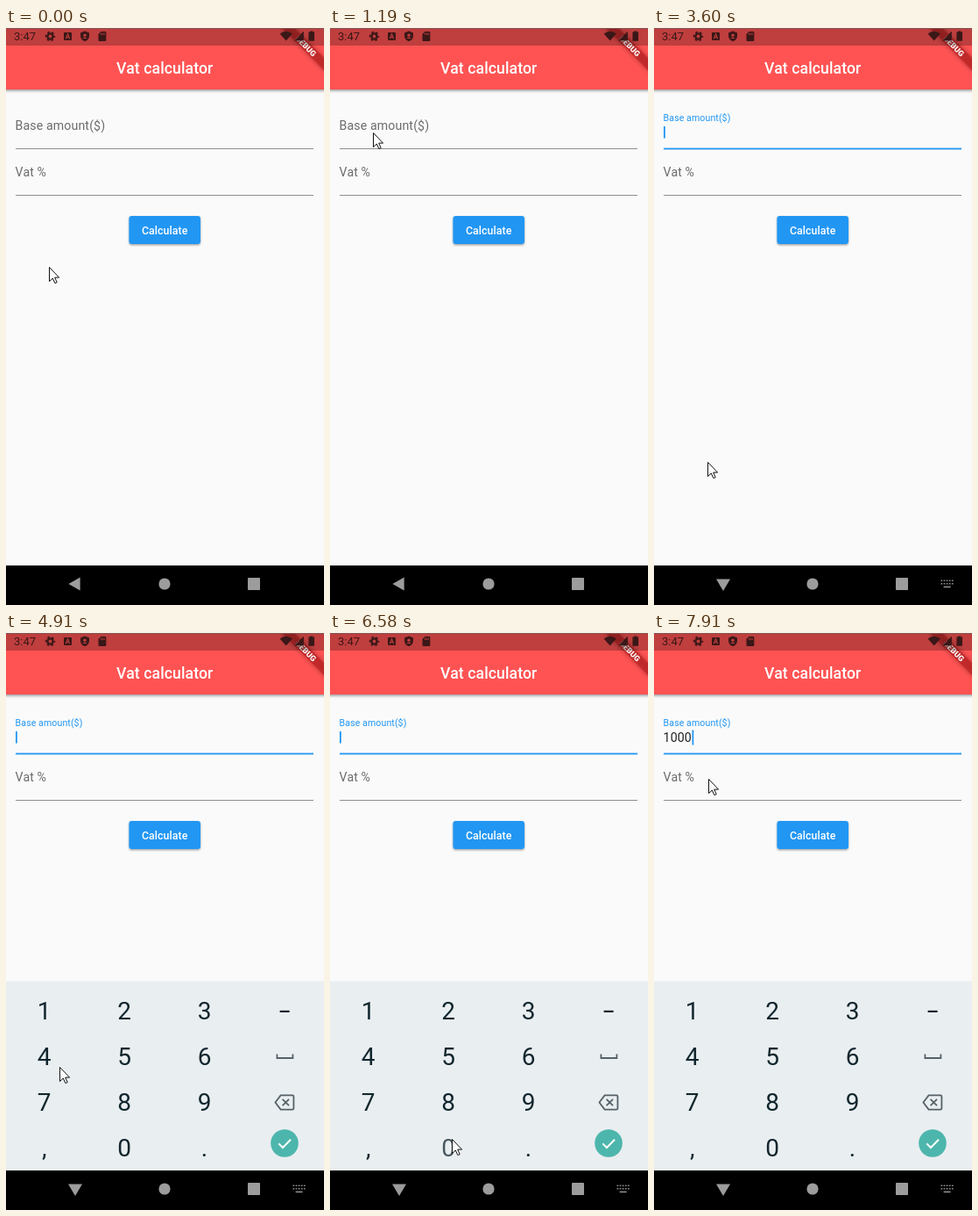
Animation of 363 by 657 pixels, one loop 8 s. Source, as an HTML page:

```html
<!DOCTYPE html>
<html lang="en">
<head>
<meta charset="utf-8">
<title>Vat calculator</title>
<style>
  html, body { margin: 0; width: 100%; height: 100%; overflow: hidden; background: #fafafa; }
  svg { display: block; width: 363px; height: 657px; font-family: Roboto, Arial, sans-serif; }
  .mid { text-anchor: middle; }
  .medium { font-weight: 500; fill: #fff; }
  .field { font-size: 14.13px; letter-spacing: .13px; }
  .label { fill: #6c6c6c; }
  .focus { fill: #2196f3; }
  .digit { font-size: 28px; fill: #11262d; }
  .icon { fill: #3b1717; }
  .nav { fill: #9c9c9c; }
</style>
</head>
<body>
<svg viewBox="0 0 363 657" xmlns="http://www.w3.org/2000/svg">
  <defs>
    <filter id="barShadow" x="-5%" y="-20%" width="110%" height="150%">
      <feDropShadow dx="0" dy="1.6" stdDeviation="1.7" flood-opacity=".38"/>
    </filter>
    <filter id="btnShadow" x="-10%" y="-20%" width="120%" height="150%">
      <feDropShadow dx="0" dy="1.3" stdDeviation="1" flood-opacity=".36"/>
    </filter>
    <filter id="bannerShadow" x="-10%" y="-80%" width="120%" height="260%">
      <feDropShadow dx="0" dy="0" stdDeviation="2.4" flood-opacity=".5"/>
    </filter>
  </defs>
  <rect width="363" height="657" fill="#fafafa"/>

  <!-- app bar -->
  <rect x="-6" y="-6" width="375" height="76" fill="#ff5252" filter="url(#barShadow)"/>
  <text class="mid medium" x="181.2" y="52" font-size="17.66" letter-spacing=".08">Vat calculator</text>

  <!-- form -->
  <text id="baseLabel" class="field label" x="10.6" y="116">Base amount($)</text>
  <text id="value" class="field" x="10.6" y="123.5" fill="#222"></text>
  <rect id="baseLine" x="11" width="340"/>
  <rect id="caret" fill="#2196f3"/>
  <text class="field label" x="10.6" y="169">Vat %</text>
  <rect x="11" y="190" width="340" height="1" fill="#8f8f8f"/>
  <rect x="140.4" y="214" width="81.6" height="32" rx="3.2" fill="#2196f3" filter="url(#btnShadow)"/>
  <text class="mid medium" x="181.2" y="234.5" font-size="12.36" letter-spacing=".08">Calculate</text>

  <!-- corner banner -->
  <g transform="translate(363 0) rotate(45)">
    <rect x="-36" y="23.7" width="72" height="10.6" fill="#b71c1c" fill-opacity=".63" filter="url(#bannerShadow)"/>
    <text class="mid" x="0" y="32.3" font-size="9" font-weight="900" fill="#fff">DEBUG</text>
  </g>

  <!-- status bar -->
  <rect width="363" height="20" opacity=".25"/>
  <rect width="363" height="1" fill="#855656"/>
  <g class="icon">
    <text x="9" y="14.4" font-size="13">3:47</text>
    <g fill="none" stroke="#3b1717">
      <circle cx="50.5" cy="9.5" r="3.1" stroke-width="2.4"/>
      <circle cx="50.5" cy="9.5" r="4.9" stroke-width="1.6" stroke-dasharray="2.6 2.53" stroke-dashoffset="1.3"/>
    </g>
    <rect x="66" y="5" width="9" height="9" rx="1"/>
    <path d="M68.4 12.2L70.5 6.8L72.6 12.2M69.2 10.5H71.8" fill="none" stroke="#bf3e3e" stroke-width="1.1"/>
    <path d="M90 3.6L95 5.6V9C95 12 92.8 14.4 90 15.2C87.2 14.4 85 12 85 9V5.6Z"/>
    <circle cx="90" cy="8.2" r="1.7" fill="#bf3e3e"/>
    <path d="M87.6 12C88 10.2 92 10.2 92.4 12Z" fill="#bf3e3e"/>
    <path d="M108.5 4H113.2Q114.3 4 114.3 5V14Q114.3 15 113.2 15H106.6Q105.5 15 105.5 14V7Z"/>
    <path d="M108.6 5.6V8M110.4 5.6V8M112.2 5.6V8" stroke="#bf3e3e" stroke-width=".9"/>
    <path d="M312.6 6.5Q319.7 1.2 326.8 6.5L319.7 14.6Z"/>
    <path d="M339.8 3.8V14.5H329.2Z"/>
    <path d="M347.2 4.6V3.4H350.2V4.6H352V14.8H345.4V4.6Z"/>
  </g>

  <!-- number pad -->
  <g id="pad">
    <rect y="396" width="363" height="1" fill="#f1f4f5"/>
    <rect y="397" width="363" height="215" fill="#e9eef1"/>
    <g id="digits"></g>
    <rect x="312.6" y="429.8" width="11" height="2.2" fill="#11262d"/>
    <g fill="none" stroke="#566168" stroke-width="1.8">
      <path d="M309.4 479.6V484H327.4V479.6"/>
      <path d="M313.6 526.4H327Q328.4 526.4 328.4 527.8V541.2Q328.4 542.6 327 542.6H313.6L307.4 534.5Z" stroke-linejoin="round"/>
      <path d="M315.6 530.8L323 538.2M323 530.8L315.6 538.2"/>
    </g>
    <circle cx="318" cy="581" r="15.8" fill="#4db6ac"/>
    <path d="M311.3 581.4L315.9 586L325 576.8" fill="none" stroke="#fff" stroke-width="2"/>
  </g>

  <!-- navigation bar -->
  <rect y="612" width="363" height="45"/>
  <path id="back" class="nav"/>
  <circle class="nav" cx="181" cy="633" r="6.6"/>
  <rect class="nav" x="276" y="626" width="14" height="14" rx=".8"/>
  <g id="kbIcon" fill="none" stroke="#8e8e8e" stroke-width="1.6">
    <path d="M327.5 629.3H342M327.5 632.8H342" stroke-dasharray="1.7 1.4"/>
    <path d="M330.6 636.4H338.6"/>
  </g>

  <path id="cursor" d="M.5 .5V16.6L4.3 13L6.9 18.6L9.2 17.6L6.7 12.1H11.6Z" fill="#fff" stroke="#111" stroke-width="1"/>
</svg>

<script>
const LOOP = 8000;
const FOCUS = 2740, PAD = 4910;
const $ = id => document.getElementById(id);

// [time, x, y] of the pointer; it jumps from place to place
const pointer = [
  [0, 49, 272], [530, 81, 243], [670, 112, 208], [790, 125, 168], [910, 98, 132],
  [1040, 57, 116], [1190, 49, 119], [2990, 50, 150], [3110, 54, 270], [3230, 59, 420],
  [3350, 61, 494], [5290, 59, 480], [5415, 49, 450], [5540, 42, 434], [5680, 96, 522],
  [5800, 139, 576], [7490, 134, 523], [7640, 94, 194], [7790, 70, 171], [7910, 62, 166]
];
const typed = [[0, ""], [6960, "1"], [7210, "1000"]];
const caretOff = [[3230, 3600], [5290, 5540], [7490, 7910]];

const stepAt = (track, t) => track.filter(k => k[0] <= t).pop();
const within = (t, [from, to]) => t >= from && t < to;
const set = (el, attrs) => { for (const k in attrs) el.setAttribute(k, attrs[k]); };

const keys = {};
["123", "456", "789", ",0."].forEach((row, r) => [...row].forEach((ch, c) => {
  const key = document.createElementNS("http://www.w3.org/2000/svg", "text");
  set(key, { class: "digit mid", x: 43.7 + c * 91.4, y: 440.3 + r * 52 });
  key.textContent = ch;
  $("digits").append(key);
  keys[ch] = key;
}));

function draw(t) {
  const [, x, y] = stepAt(pointer, t);
  const text = stepAt(typed, t)[1];
  const focused = t >= FOCUS;

  set($("cursor"), { transform: `translate(${x} ${y})` });
  set($("baseLabel"), {
    class: focused ? "field focus" : "field label",
    transform: focused ? "translate(2.65 19) scale(.75)" : ""
  });
  set($("baseLine"), focused
    ? { y: 136.6, height: 1.8, fill: "#2196f3" }
    : { y: 137, height: 1, fill: "#8f8f8f" });

  $("value").textContent = text;
  set($("caret"), {
    x: text ? 11.2 + text.length * 8.07 : 11,
    y: text ? 110.5 : 112,
    width: 1.8,
    height: text ? 17 : 13.5,
    visibility: focused && !caretOff.some(r => within(t, r)) ? "visible" : "hidden"
  });

  set($("pad"), { visibility: t >= PAD ? "visible" : "hidden" });
  set(keys["0"], { opacity: within(t, [6580, 6710]) ? .75 : 1 });
  set($("back"), { d: focused ? "M71 627.4H87L79 641Z" : "M84.6 625.6V640.6L71.4 633.1Z" });
  set($("kbIcon"), { visibility: focused ? "visible" : "hidden" });
}

const start = performance.now();
function tick() {
  draw((performance.now() - start) % LOOP);
  requestAnimationFrame(tick);
}
draw(0);
requestAnimationFrame(tick);
</script>
</body>
</html>
```
